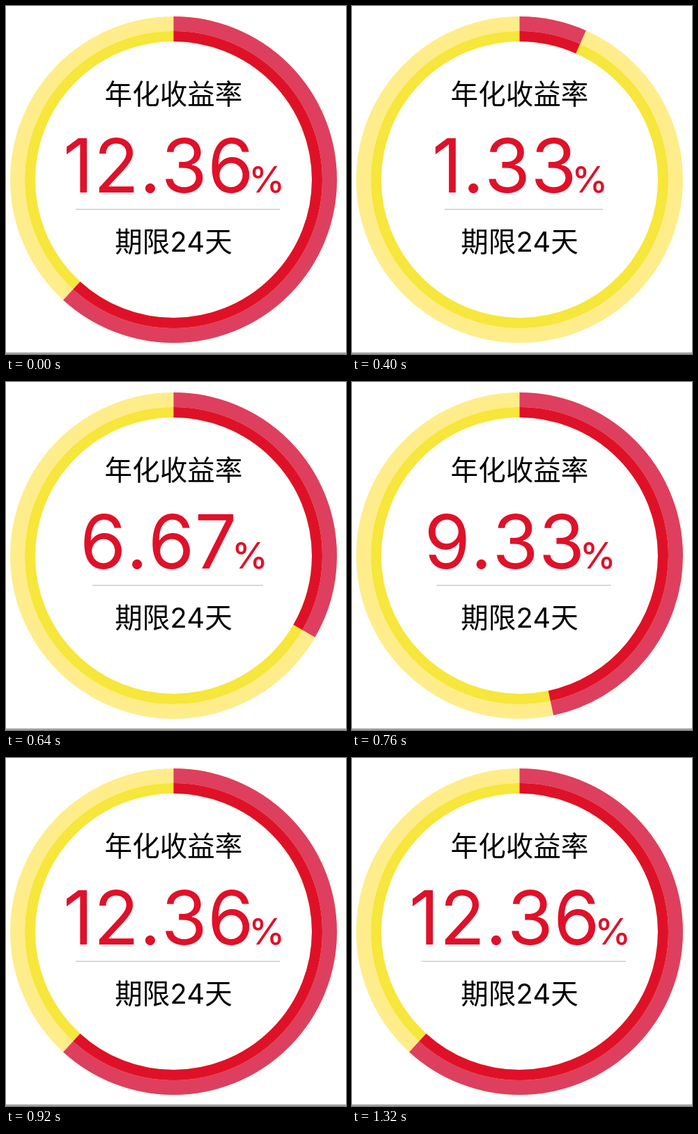
Recreate the animation shown at these times as an HTML page. Size 488 px wide and 500 px high, loop 1360 ms.

```html
<!DOCTYPE html>
<html lang="zh-CN">
<head>
<meta charset="utf-8">
<title>年化收益率</title>
<style>
  html, body { margin: 0; width: 100%; height: 100%; overflow: hidden; background: #fff; }
  svg { display: block; width: 488px; height: 500px; }
  text {
    font-family: Inter, "Noto Sans CJK SC", "Noto Sans CJK", sans-serif;
    font-size: 39.6px;
    font-optical-sizing: none;
    font-kerning: none;
    text-anchor: middle;
  }
  circle { fill: none; }
  .outer { stroke-width: 21; }
  .inner { stroke-width: 15; }
  #rate { font-size: 107px; fill: #df1129; }
  #num { letter-spacing: 0.4px; }
  #unit { font-size: 52px; font-weight: 500; }
</style>
</head>
<body>
<svg viewBox="0 0 488 500">
  <g transform="translate(240.5 249.5) rotate(-90)">
    <circle class="outer" r="224" stroke="#feed8a"/>
    <circle class="inner" r="206" stroke="#f7e63b"/>
    <circle class="outer arc" r="224" stroke="#de3f5e" pathLength="20"/>
    <circle class="inner arc" r="206" stroke="#df1129" pathLength="20"/>
  </g>
  <text x="240.5" y="141">年化收益率</text>
  <text id="rate" x="241" y="267.5"><tspan id="num">12.36</tspan><tspan id="unit" dx="-7.5">%</tspan></text>
  <rect id="rule" y="291.5" height="1.5" fill="#ccc"/>
  <text x="240.5" y="353">期限24天</text>
  <rect y="498" width="488" height="1.5" fill="#7a7a7a"/>
</svg>
<script>
  const LOOP = 1360, FRAME = 40;      // ms
  const START = 336, TICK = 15;       // counter restart and tick length, ms
  const STEP = 1 / 3, TARGET = 12.36; // percent; a full ring is 20

  const get = id => document.getElementById(id);
  const rate = get('rate'), num = get('num'), rule = get('rule');
  const arcs = document.querySelectorAll('.arc');
  let shown = null;

  function valueAt(t) {
    if (t < START) return TARGET;
    return Math.min(TARGET, Math.floor((t - START) / TICK) * STEP);
  }

  function show(value) {
    if (value === shown) return;
    shown = value;
    num.textContent = value.toFixed(2);
    arcs.forEach(arc => arc.setAttribute('stroke-dasharray', `${value} 40`));
    const width = rate.getBBox().width - 25;
    rule.setAttribute('x', 246.5 - width / 2);
    rule.setAttribute('width', width);
  }

  function draw() {
    const t = performance.now() % LOOP;
    show(valueAt(Math.floor(t / FRAME) * FRAME));
    requestAnimationFrame(draw);
  }
  draw();
</script>
</body>
</html>
```
